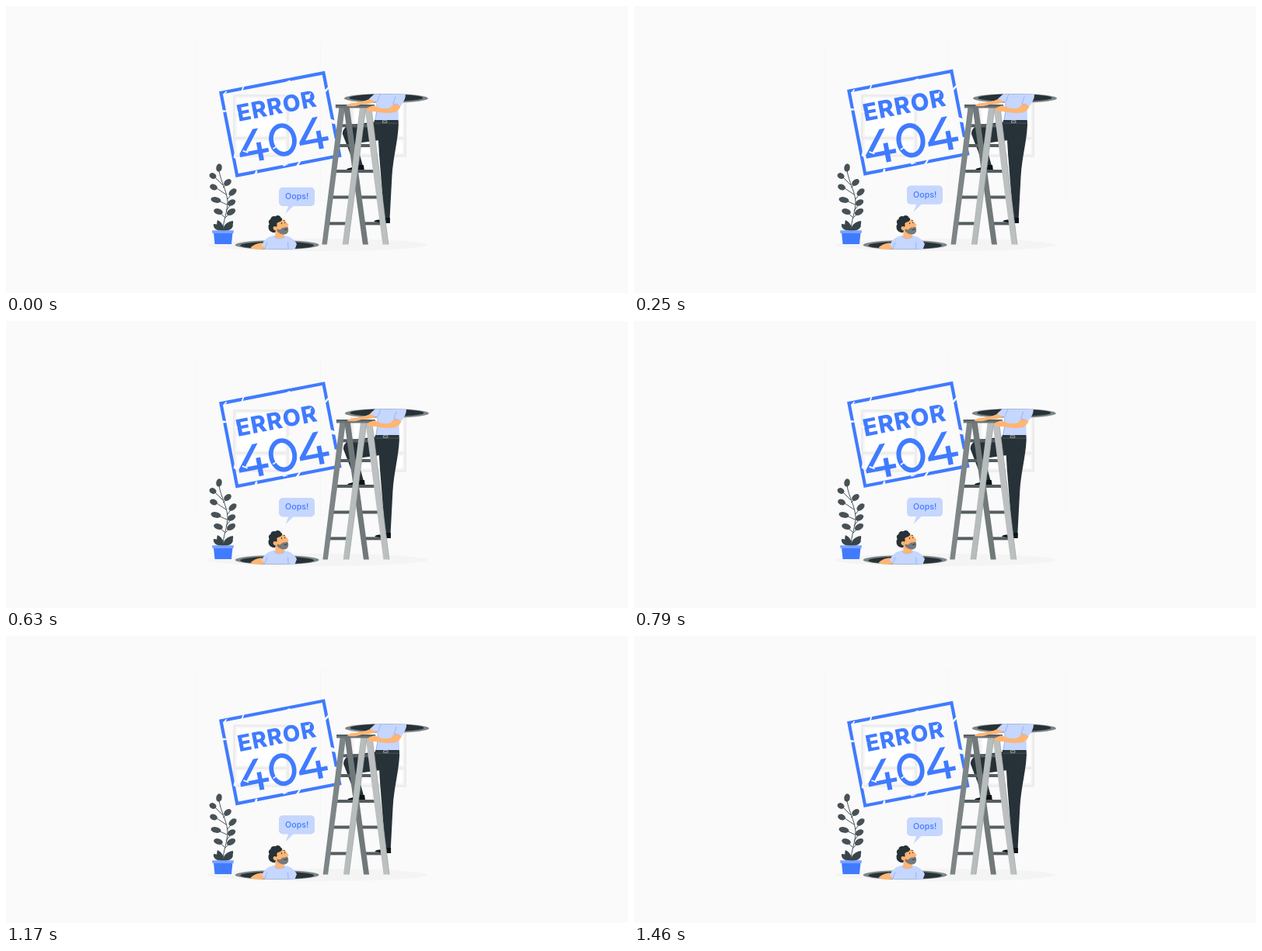
Animation, 800 px wide and 370 px high, one loop 1500 ms. Source, as an HTML page:

```html
<!DOCTYPE html>
<html lang="en">
<head>
<meta charset="utf-8">
<title>Error 404</title>
<style>
  html, body { margin: 0; width: 100%; height: 100%; overflow: hidden; background: #fafafa; }
  svg { display: block; width: 800px; height: 370px; }
  text { font-family: Inter, "Open Sans", sans-serif; text-anchor: middle; }
  .blue { fill: #407bff; }
  .pale { fill: #c5d6ff; }
  .dark { fill: #263238; }
  .skin { fill: #ffb573; }
  .chip { fill: #fafafa; }
  .crease { fill: none; stroke: #7f9ce6; stroke-width: .6; stroke-linecap: round; }
</style>
</head>
<body>
<svg viewBox="0 0 800 370" role="img" aria-label="Error 404">
  <defs>
    <g id="window">
      <path fill="#fff" d="M2 2h70v79H2z"/>
      <path fill="none" stroke="#ededed" stroke-width="3.2" d="M2.6 2.6h69v77.6h-69zM2.6 57.5h69"/>
      <path fill="none" stroke="#f5f5f5" stroke-width="1.6" d="M5.2 5.2h63.8v49.8H5.2zM5.2 60.2h63.8v17.4H5.2z"/>
    </g>
    <path id="four" d="M22.5-41h7L8.4-14.2h15.4v-9h5.7v9h8v5.2h-8v9h-6v-9H.4v-4.2z"/>
    <g id="hole">
      <ellipse rx="54" ry="6" fill="#7d8586"/>
      <ellipse cy=".6" rx="47.5" ry="4.9" class="dark"/>
    </g>
  </defs>

  <path fill="none" stroke="#f7f7f7" stroke-width=".8" d="M244.500 45h159.500v205.500h-159.500zM404 45h150v205.500h-150z"/>
  <ellipse cx="400" cy="308" rx="142" ry="8" fill="#f4f4f4"/>
  <use href="#window" x="291" y="113"/>
  <use href="#window" x="442" y="113"/>

  <g id="stamp">
    <g transform="translate(274 110.4) rotate(-11)">
      <path fill="none" stroke="#407bff" stroke-width="4.2" d="M2.1 2.1h134.400v108.700H2.1z"/>
      <path class="chip" d="M4 5l5-4 1 1-4 4zM28 5l3.500-6h2l-3.500 6zM84 5l8-2 1 2zM133 25l7-5v3l-6 4.500zM134 62l5 3v5l-5-2zM134 88l3 1-1 6-2 1zM78 114l6-6h2.500l-5 6zM62 108l8 1.500-7 1zM24 114l3-5 2 1-2 5zM-1 24l6 2v1.500l-6 0zM5 80l-3 7 3 3z"/>
    </g>
  </g>

  <g id="lettering">
    <g class="blue">
      <text x="-2.600" y="-16.400" font-size="29" font-weight="800" letter-spacing="1">ERROR</text>
      <g transform="translate(-60.8 37.4)">
        <use href="#four"/>
        <ellipse cx="57.500" cy="-20.500" rx="14.600" ry="18.200" fill="none" stroke="#407bff" stroke-width="5.700"/>
        <use href="#four" x="77"/>
      </g>
    </g>
    <path class="chip" d="M-56-31l5 3-5 1zM36-29l6-6 1 1-5 6zM-55 20l6 4-1 1.200-6-3.500zM6-3l3-3 3 5-2 1zM-18 25l5-2v1.500l-4 2zM36 16l5-6 1 1-4 6z"/>
  </g>

  <g id="plant">
    <path fill="none" stroke="#37434a" stroke-width=".9" d="M279 290C279 277 285 266 285 252C284 238 276 226 274 212M279 231L268 220M279 234L285 229M283 243L268 233M285 249L291 241M284 256L271 250M283 264L289 256M281 272L273 265M281 274L289 266"/>
    <g id="leaves" fill="#485156"></g>
    <path class="dark" d="M279 290c-9 0-13-4-12-9c7 0 12 3 12 9c0-7 5-12 13-13c1 7-3 13-13 13z" opacity=".9"/>
    <path fill="#38444a" d="M279 290c-7-3-9-8-7-14c6 3 9 8 7 14c3-7 8-9 13-7c-1 5-6 7-13 7z"/>
    <path class="blue" d="M267 292h24.500l-1.500 15h-21.500z"/>
    <path fill="#79a1ff" d="M265 289.300h28l-.500 3.700h-27z"/>
  </g>

  <g id="visitor">
    <use href="#hole" x="348.700" y="308"/>
    <path class="skin" d="M314.500 312c3-4 9-6.500 15-6.500l5 8h-15z"/>
    <path class="pale" d="M328.500 309c3-7 8-12 16.500-13.200l13 .2c8 1 13 5 16 11l-2.500 6.800h-38.500c0-2-1.500-4-4.500-4.800z"/>
    <path class="crease" d="M333 313c1-4 2-6 3-8M363 313c0-3 0-5-.5-8M345 297c2 3 7 4 13 1"/>
    <path class="skin" d="M347 288l-1 9c3 4 9 4 12 0l-1-5z"/>
    <g transform="translate(352 289) rotate(-12) scale(.95) translate(-352 -289)">
      <path class="skin" d="M346 278c2-4 7-5 11-3c4 1 6 4 6.500 6l2 4-2 1c0 5-3 8-8 8c-6 0-10-5-10-10z"/>
      <path fill="#747a7e" d="M347 285c2 2 4 3 6 3.500c2-2 5-2.500 7-1.500l3.500-.5c1 4.500-.5 9-5 9.500c-6 0-10-4-11.500-11z"/>
      <path fill="#263238" d="M357.500 289.500c2 .5 3.500 0 4.500-1c0 2-2.500 3-4.500 1z"/>
      <path class="dark" d="M345 291c-5-1-8-5-7-9c0-2 1-3 2-4c-1-4 1-6 3-6c1-4 5-4 7-2.500c4-2 7 1 7 3c2 1 2 4-1 5c-3 1-6 0-6 3c0 2-1 4-3 4c0 3 0 5-2 6.500z"/>
      <path class="skin" d="M349 284c-3-3-6-1-5 2c1 2 3 3 5 2z"/>
      <path fill="none" stroke="#263238" stroke-width=".8" stroke-linecap="round" d="M354 277.500l2.500-1M360 277l1.500.7"/>
      <ellipse class="dark" cx="356.500" cy="280.500" rx=".7" ry="1"/>
      <ellipse class="dark" cx="361" cy="280.500" rx=".6" ry=".9"/>
    </g>
  </g>

  <g id="bubble">
    <path class="pale" d="M356 233.900h36a5 5 0 0 1 5 5v14.300a5 5 0 0 1-5 5h-22.500l-10 9.700 3.700-9.700h-7.200a5 5 0 0 1-5-5v-14.300a5 5 0 0 1 5-5z"/>
    <text class="blue" x="374.200" y="249.300" font-size="10.700" font-weight="500">Oops!</text>
  </g>

  <g id="climber">
    <use href="#hole" transform="translate(489 119) scale(1 -1)"/>
    <path class="dark" d="M476 149l-30 4c-8 1-13 5-13 12l16 42 10-1-8-29 29-4z"/>
    <path fill="#0e1518" d="M449 205l-5 3.500c-3 .5-6 1-6 3.500h23l-1-7z"/>
    <g id="rungs" fill="#555e61"></g>
    <path fill="#7d8587" d="M428.500 131h7.500l-23 176.500h-6.500z"/>
    <path fill="#70787a" d="M434.500 131h7.500l24 176.500h-7z"/>
    <path class="dark" d="M474 147h30.500l.5 6c-1 22-7 42-8.500 67l-3 57h-6.500l-7-87-1-17-5-2z"/>
    <path fill="#0e1518" d="M487 273l-5 2.500c-4 0-8 .5-8.500 2.500l14 2h6.500v-7z"/>
    <path fill="#b7bcbd" d="M455 131h8l-23 176.500h-7.200z"/>
    <path fill="#bcc0c1" d="M461.500 131h8.500l22 176.500h-7.500z"/>
    <path fill="none" stroke="#999fa1" stroke-width=".7" d="M463 131l-23 176.500M470 131l22 176.500"/>
    <path fill="#6a7274" d="M424 127.200h50v4.200h-50z"/>
    <path fill="#4d5659" d="M424 127.200h50v1.600h-50z"/>
    <path class="skin" d="M469 119l8 3c-5 4-13 5-21 5c-4 2-12 3-18 1.800c0-2 4-3 10-4c7-1 15-2 21-5.800z"/>
    <path class="pale" d="M474 113.300h39.500c1.500 3-1 9-5 15l-4-1 .5 20.500h-30.500c0-6 3-13 2.500-19l-1-5-9-4z"/>
    <path class="crease" d="M481 114l-4 10M501 117l-3 9 7 1.500M477 126c0 6 0 13-2 21"/>
    <path class="skin" d="M498 126.500l10 2c-2 5-5 8-10 9c-9 1-18 0-24-1.500c-4 0-9 0-11-2c0-2 4-4 9-5.500c4 0 6 2 9 3c6 1 11 1 14-1z"/>
    <path fill="#2b363b" d="M474 147h30.500v4h-30.500z"/>
    <path fill="none" stroke="#9ba3a6" stroke-width="1" d="M484.500 147.800h5.500v2.600h-5.500z"/>
    <path fill="none" stroke="#6b7478" stroke-width=".5" d="M474.500 151.200h30"/>
  </g>
</svg>

<script>
const LOOP = 1500, FRAMES = 36, LEAD = 25;
const NS = "http://www.w3.org/2000/svg";
const el = id => document.getElementById(id);

function add(parent, tag, attrs) {
  const node = document.createElementNS(NS, tag);
  for (const name in attrs) node.setAttribute(name, attrs[name]);
  parent.append(node);
}

// Leaves: centre x, y, half length, angle
[[274, 208.5, 5.2, -80], [266, 219, 4.6, 25], [285, 227.5, 5.4, -38],
 [267, 233.5, 5, 20], [291.5, 240, 5.8, -40], [270, 250, 6.6, 12],
 [290, 253.5, 5.6, -30], [273, 265, 6, 18], [289.5, 265.5, 6.2, -32]]
  .forEach(([x, y, r, a]) => add(el("leaves"), "ellipse",
    { rx: r, ry: 3.7, transform: `translate(${x} ${y}) rotate(${a})` }));

for (const y of [152.3, 178, 211, 244.5, 278.4]) {
  const k = (y - 131) / 176.5;
  add(el("rungs"), "rect", { x: 433 - 23 * k, y, width: 26, height: 4 });
  add(el("rungs"), "rect", { x: 439 + 24 * k, y, width: 26, height: 4 });
}

const FLOAT = [[0, 0], [.5, -6.7], [1, 0]];
const BEAT = [[0, 1], [.1, 1.1], [.3, 1], [.4, 1], [.5, 1.1], [.6, 1], [1, 1]];
const SHAKE = [0, -1, 2, -4, 4, -4, 4, -4, 2, -1, 0].map((v, i) => [i / 10, v * .67]);

function at(keys, p) {
  const i = Math.max(1, keys.findIndex(k => k[0] >= p));
  const [t0, v0] = keys[i - 1], [t1, v1] = keys[i];
  return v0 + (v1 - v0) * (p - t0) / (t1 - t0);
}

const move = (id, value) => el(id).setAttribute("transform", value);

function draw(now) {
  const step = Math.floor((now % LOOP + 3) / LOOP * FRAMES);
  const p = (step / FRAMES + LEAD / LOOP) % 1;
  const lift = `translate(0 ${at(FLOAT, p)})`;
  move("stamp", lift);
  move("bubble", lift);
  move("climber", `translate(${at(SHAKE, p)} 0)`);
  move("lettering", `translate(356 155) rotate(-11) scale(${at(BEAT, p)})`);
  requestAnimationFrame(draw);
}
draw(performance.now());
</script>
</body>
</html>
```
